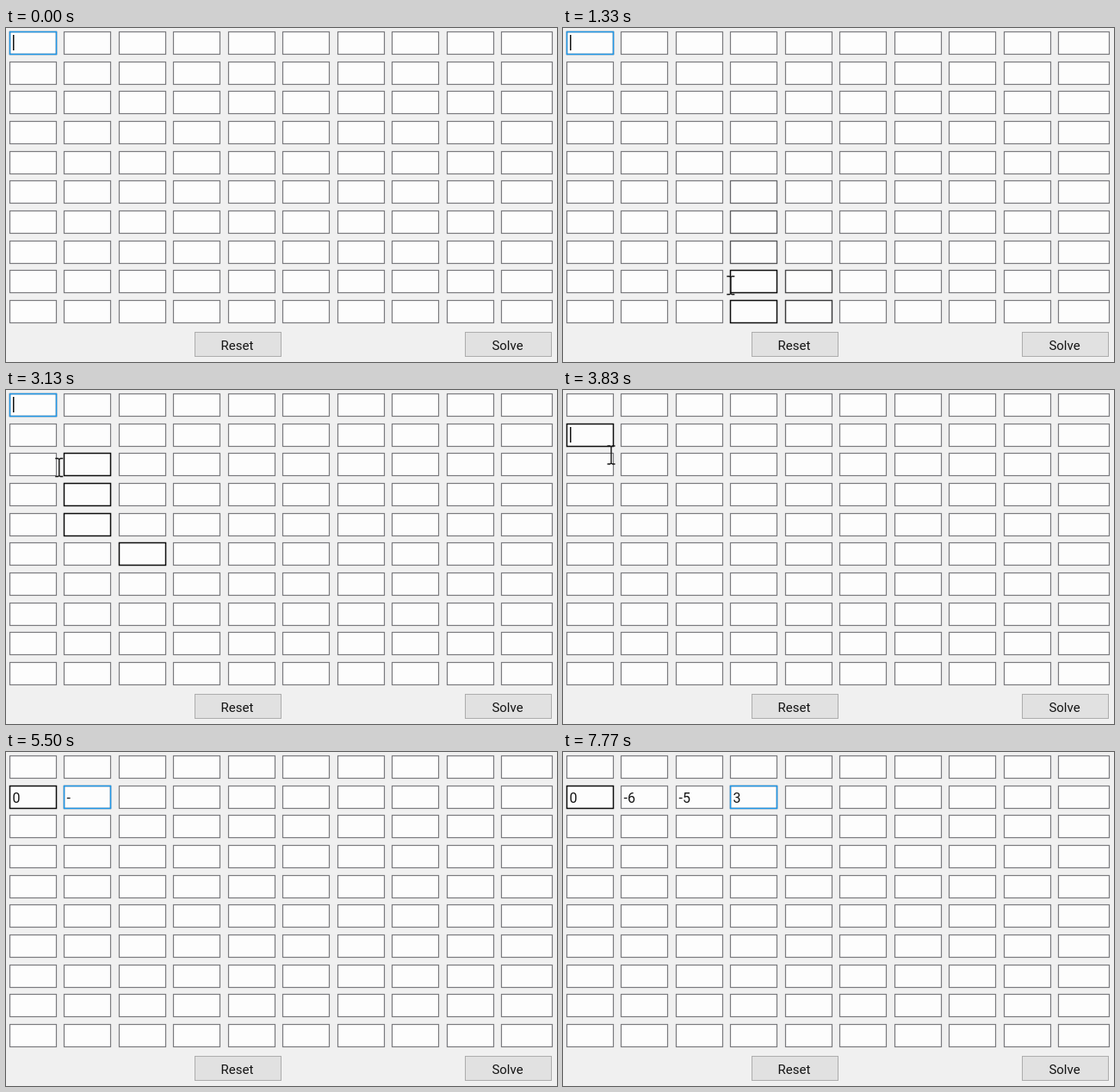
Recreate the animation shown at these times as an HTML page. Size 640 by 388 pixels, loop 8000 ms.

```html
<!DOCTYPE html>
<html lang="en">
<head>
<meta charset="utf-8">
<title>Grid entry</title>
<style>
  html, body { margin: 0; width: 100%; height: 100%; overflow: hidden; background: #f0f0f0; }
  svg { display: block; width: 640px; height: 388px; }
  text { font-family: Roboto, "Liberation Sans", sans-serif; fill: #141414; }
</style>
</head>
<body>
<svg id="stage" viewBox="0 0 640 388"></svg>
<script>
const LOOP = 8000;
const SIZE = 10;
const CELL_HEIGHT = 27;
const FOCUS_FADE = 220;
const HOVER_HOLD = 280, HOVER_FADE = 180;
const stage = document.getElementById('stage');

function add(tag, attrs) {
  const node = document.createElementNS('http://www.w3.org/2000/svg', tag);
  for (const key in attrs) node.setAttribute(key, attrs[key]);
  stage.appendChild(node);
  return node;
}

const show = (node, on) => node.setAttribute('visibility', on ? 'visible' : 'hidden');
const clamp = v => Math.max(0, Math.min(1, v));
const cellX = col => Math.round(4 + col * 63.44);
const cellY = row => Math.round(4 + row * 34.67);
const cellWidth = col => col === SIZE - 1 ? 60 : 55;

function cellRect(col, row, attrs) {
  return add('rect', {
    x: cellX(col) + 0.5, y: cellY(row) + 0.5,
    width: cellWidth(col) - 1, height: CELL_HEIGHT - 1, ...attrs
  });
}

const glow = (col, row, stroke) => cellRect(col, row, { fill: 'none', stroke, 'stroke-width': 1.4 });

function button(x, label) {
  add('rect', { x: x + 0.5, y: 353.5, width: 100, height: 28, fill: '#e1e1e1', stroke: '#adadad' });
  add('text', { x: x + 49.5, y: 374, 'font-size': 15, 'text-anchor': 'middle' }).textContent = label;
}

// Pointer path: time, x, y
const path = [
  [800, 100, 35], [833, 142, 88], [867, 160, 150], [900, 215, 190], [970, 285, 332],
  [1010, 307, 375], [1040, 320, 400], [1200, 214, 400], [1290, 212, 325], [1330, 195, 289],
  [1440, 176, 232], [1600, 166, 208], [2830, 166, 208], [2870, 158, 190], [2930, 110, 157],
  [3000, 92, 122], [3130, 62, 80], [3260, 30, 20], [3340, 34, 24], [3500, 56, 65], [LOOP, 56, 65]
];

function pointerAt(t) {
  const next = path.findIndex(key => key[0] > t);
  if (next < 1) return null;
  const [t0, x0, y0] = path[next - 1], [t1, x1, y1] = path[next];
  const p = (t - t0) / (t1 - t0);
  return [x0 + (x1 - x0) * p, y0 + (y1 - y0) * p];
}

function inCell([x, y], { col, row }, slack) {
  const dx = x - cellX(col), dy = y - cellY(row);
  return dx >= -slack && dx <= cellWidth(col) + slack && dy >= 0 && dy <= CELL_HEIGHT;
}

add('rect', { width: 640, height: 388, fill: '#f0f0f0' });
const cells = [];
for (let row = 0; row < SIZE; row++)
  for (let col = 0; col < SIZE; col++) {
    cellRect(col, row, { fill: '#fdfdfd', stroke: '#7a7a7e', 'stroke-width': 1.2 });
    cells.push({ col, row, visits: [] });
  }
button(219, 'Reset');
button(533, 'Solve');

// Note when the pointer is over each cell, then outline the visited ones
for (let t = 0; t < LOOP; t += 10) {
  const pos = pointerAt(t);
  if (pos) cells.filter(cell => inCell(pos, cell, -2)).forEach(cell => cell.visits.push(t));
}
const hovers = cells.filter(cell => cell.visits.length)
  .map(({ col, row, visits }) => ({ visits, node: glow(col, row, '#0c0c0c') }));

function hoverLevel(visits, t) {
  const last = visits.filter(v => v <= t).pop();
  return last === undefined ? 0 : 1 - clamp((t - last - HOVER_HOLD) / HOVER_FADE);
}

// Focused cells: column, row, start, end
const focuses = [
  [0, 0, -FOCUS_FADE, 3610], [1, 1, 4770, 5900], [2, 1, 5900, 6950], [3, 1, 6950, LOOP]
].map(([col, row, from, to]) => ({
  from, to,
  backing: cellRect(col, row, { fill: 'none', stroke: '#7a7a7e', 'stroke-width': 1.4 }),
  node: glow(col, row, '#1c97ea')
}));

// Typed values: time and text so far
const entries = [
  [[4570, '0']],
  [[5500, '-'], [5600, '-6']],
  [[6540, '-'], [6800, '-5']],
  [[7670, '3']]
].map((keys, col) => ({
  keys, node: add('text', { x: cellX(col) + 3.5, y: 58.5, 'font-size': 16 })
}));

const caret = add('rect', { x: 8, width: 1.5, height: 18, fill: '#111' });

const arrow = add('path', {
  d: 'M0 0V22.5L5 18L9 26.5L12.5 25L8.8 16.5H16Z',
  fill: '#fdfdfd', stroke: '#1a1a1a', 'stroke-width': 1.3
});
const beam = add('path', {
  d: 'M-4.5 0H-1.5L0 1L1.5 0H4.5M-4.5 21H-1.5L0 20L1.5 21H4.5M0 1V20',
  fill: 'none', stroke: '#141414', 'stroke-width': 1.4
});

function render(t) {
  for (const { node, visits } of hovers) node.setAttribute('opacity', hoverLevel(visits, t));

  for (const { node, backing, from, to } of focuses) {
    node.setAttribute('opacity', clamp((t - from) / FOCUS_FADE) * (1 - clamp((t - to) / FOCUS_FADE)));
    show(backing, t >= from && t < to + FOCUS_FADE);
  }

  for (const { node, keys } of entries) {
    const typed = keys.filter(key => key[0] <= t).pop();
    node.textContent = typed ? typed[1] : '';
  }

  show(caret, t < 4200);
  caret.setAttribute('y', t < 3670 ? 8 : 43);

  // The pointer hides once typing begins
  const pos = t < 4570 && pointerAt(t);
  const overText = pos && cells.some(cell => inCell(pos, cell, 4));
  show(beam, pos && overText);
  show(arrow, pos && !overText);
  if (pos) (overText ? beam : arrow).setAttribute('transform', `translate(${pos})`);
}

const start = performance.now();
function tick() {
  render((performance.now() - start) % LOOP);
  requestAnimationFrame(tick);
}
tick();
</script>
</body>
</html>
```
